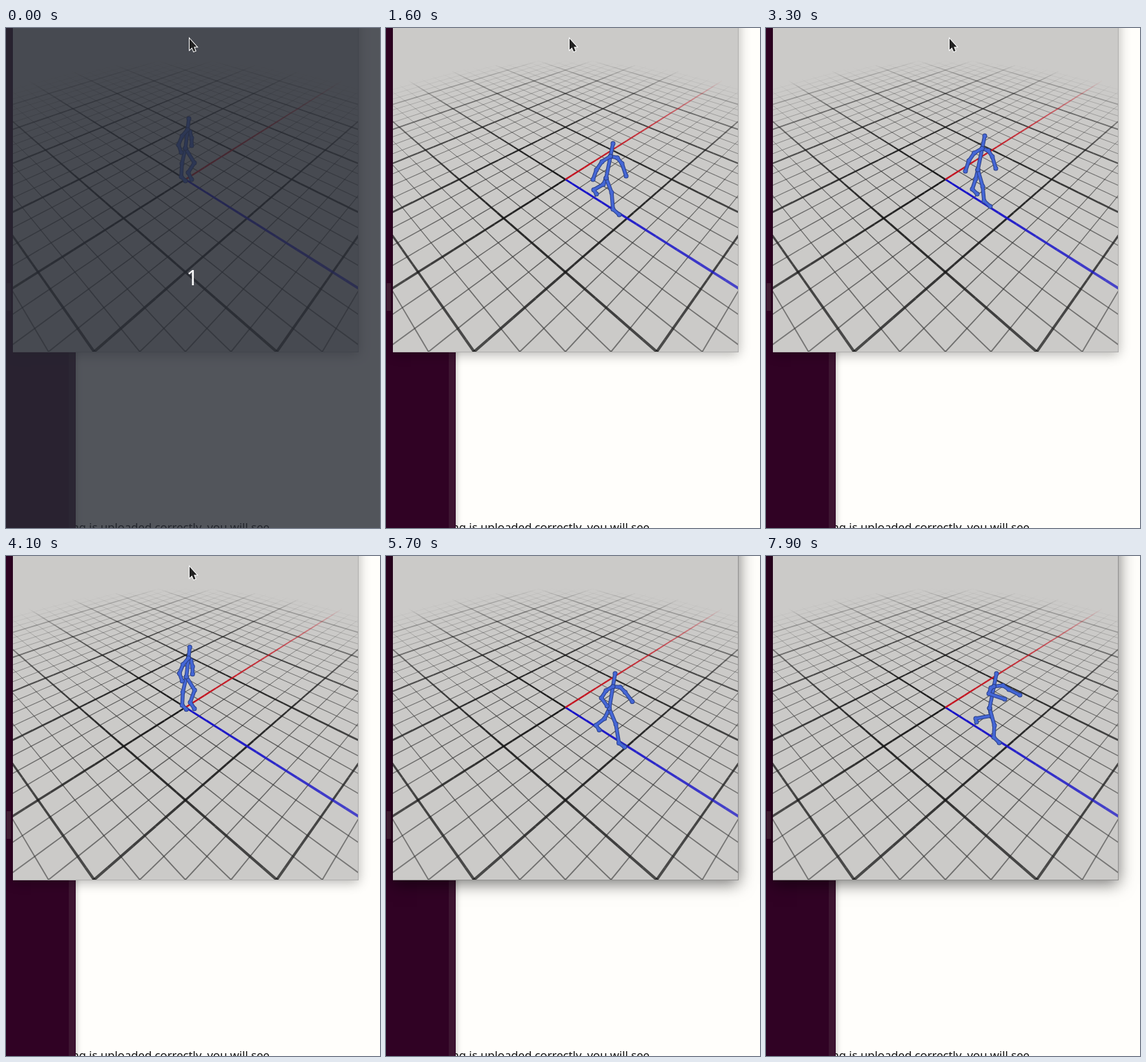
An HTML page with a canvas that plays this animation: 542x723 px, repeating every 8 s.

```html
<!DOCTYPE html>
<html>
<head>
<meta charset="utf-8">
<style>
html, body { margin: 0; width: 100%; height: 100%; overflow: hidden; background: #fffefb; }
canvas { display: block; }
</style>
</head>
<body>
<canvas id="stage" width="542" height="723"></canvas>
<script>
const ctx = document.getElementById('stage').getContext('2d');
const LOOP = 8000, STEP = 100, CYCLE = 6100 / 3, FOCUS_AT = 5100;

// Points: head, pelvis, two arms (elbow, hand), two legs (knee, ankle, toe)
const stand = [269,133, 264,176, 254,171, 258,182, 273,161, 273,172,
  259,198, 258,217, 264,223, 274,192, 273,217, 281,224];
const stride = [283,141, 278,184, 272,166, 305,171, 300,160, 318,164,
  266,205, 257,216, 263,223, 290,206, 299,234, 305,235];
const lift = [297,147, 292,191, 282,188, 284,200, 299,176, 299,187,
  285,213, 268,217, 266,224, 303,211, 299,234, 306,240];
const pass = [317,156, 307,205, 294,192, 289,207, 328,186, 333,203,
  304,218, 299,233, 306,240, 314,229, 316,250, 325,258];
const push = [329,167, 319,217, 305,205, 300,219, 342,196, 348,214,
  315,226, 301,234, 305,240, 327,238, 329,262, 338,270];
const reach = [334,170, 324,220, 323,199, 346,207, 352,193, 368,201,
  326,231, 304,235, 305,240, 331,245, 330,262, 338,270];
const first = stand.map((v, i) => v - (i % 2 ? 2 : 4)).slice(0, 18).concat([273,195, 264,209, 269,219]);
const landing = stride.map((v, i) => i % 2 ? 176 + (v - 141) * 1.2 : 338 + (v - 283) * 1.05);
const keys = [[0, first], [100, stand], [500, stride], [833, lift], [1267, pass],
  [1600, push], [1700, landing], [1800, reach], [CYCLE, first]];

const mix = (a, b, u) => a.map((v, i) => v + (b[i] - v) * u);

function poseAt(t) {
  const phase = t % CYCLE;
  const i = keys.findIndex(k => k[0] > phase);
  const [t0, a] = keys[i - 1], [t1, b] = keys[i];
  return mix(a, b, (phase - t0) / (t1 - t0));
}

function box(c, color, x, y, w, h) {
  c.fillStyle = color;
  c.fillRect(x, y, w, h);
}

function shadow(color, blur, y) {
  ctx.shadowColor = color;
  ctx.shadowBlur = blur;
  ctx.shadowOffsetY = y;
}

// Ground plane: a runs along the blue axis, b towards the lower left
function project(a, b) {
  const depth = 7.177 - a - b;
  return [260 + 552.5 * (a - b) / depth, -128 + 2490 / depth, 552.5 / depth / 77];
}

function drawGrid() {
  const view = document.createElement('canvas');
  view.width = 511;
  view.height = 469;
  const g = view.getContext('2d');
  box(g, '#cbcac8', 10, 0, 500, 468);
  g.beginPath();
  g.rect(10, 0, 500, 468);
  g.clip();

  function line(at, alongA, color, width, strength, from, to) {
    const point = s => alongA ? [s, at] : [at, s];
    g.strokeStyle = color;
    for (let s = from; s < to; s += 0.125) {
      const [a, b] = point(s + 0.0625), r = Math.hypot(a, b);
      if (r >= 5 || a + b > 5) continue;
      const p = project(...point(s)), q = project(...point(s + 0.125));
      g.globalAlpha = strength * (1 - (r / 5) ** 1.6);
      g.lineWidth = width * p[2];
      g.beginPath();
      g.moveTo(p[0], p[1]);
      g.lineTo(q[0], q[1]);
      g.stroke();
    }
  }

  for (const major of [false, true]) {
    for (let n = -20; n <= 20; n++) {
      if ((n % 4 === 0) !== major) continue;
      for (const alongA of [true, false]) {
        const from = n === 0 && !alongA ? 0 : -5, to = n === 0 && alongA ? 0 : 5;
        line(n / 4, alongA, major ? '#111' : '#222', major ? 2.4 : 1.1, major ? 0.95 : 0.72, from, to);
      }
    }
  }
  line(0, true, '#1712c8', 2.7, 1, 0, 5);
  line(0, false, '#c4121e', 2.5, 1, -5, 0);
  return view;
}

const grid = drawGrid();

function drawFigure(pose) {
  const pts = [];
  for (let i = 0; i < 24; i += 2) pts.push([pose[i], pose[i + 1]]);
  const [head, pelvis, elbowL, handL, elbowR, handR, ...legs] = pts;
  const neck = mix(head, pelvis, 0.37);
  const shoulder = elbow => {
    const [x, y] = mix(neck, elbow, 0.6);
    return [x, y - 4];
  };
  const chains = [
    [neck, shoulder(elbowR), elbowR, handR],
    [pelvis, ...legs.slice(0, 3)],
    [pelvis, ...legs.slice(3)],
    [head, neck, pelvis],
    [neck, shoulder(elbowL), elbowL, handL]
  ];
  ctx.lineCap = ctx.lineJoin = 'round';
  for (const chain of chains) {
    for (const [color, width, bead] of [['#2b4088', 5.6, 3.5], ['#4567d6', 3.6, 2.5]]) {
      ctx.strokeStyle = ctx.fillStyle = color;
      ctx.lineWidth = width;
      ctx.beginPath();
      chain.forEach(p => ctx.lineTo(...p));
      ctx.stroke();
      for (const [x, y] of chain) {
        ctx.beginPath();
        ctx.arc(x, y, bead, 0, 7);
        ctx.fill();
      }
    }
  }
}

function drawCursor() {
  const arrow = new Path2D('M266 15.5V31.5L269.6 28.2L272 34L274.6 32.9L272.2 27.2H276.6Z');
  ctx.lineJoin = 'miter';
  ctx.lineWidth = 2;
  ctx.strokeStyle = '#fff';
  ctx.stroke(arrow);
  ctx.fillStyle = '#222';
  ctx.fill(arrow);
}

function draw(t) {
  const focused = t >= FOCUS_AT;
  box(ctx, '#fffefb', 0, 0, 542, 723);
  ctx.fillStyle = '#111';
  ctx.font = '16.7px "Noto Sans", "Open Sans", sans-serif';
  ctx.textAlign = 'right';
  ctx.fillText('ng is uploaded correctly, you will see', 382, 728);

  shadow('rgba(0,0,0,.3)', 9, 1);
  box(ctx, '#300224', 0, -20, 101, 763);
  shadow('transparent', 0, 0);
  box(ctx, '#3d1531', 91, 0, 9, 723);
  box(ctx, '#452139', 1, 369, 6, 40);

  shadow(focused ? 'rgba(0,0,0,.55)' : 'rgba(0,0,0,.3)', focused ? 22 : 16, focused ? 5 : 3);
  box(ctx, focused ? '#929190' : '#b0afae', 10, -30, 501, 499);
  shadow('transparent', 0, 0);
  ctx.drawImage(grid, 0, 0);
  drawFigure(poseAt(t));

  if (t < STEP) {
    box(ctx, 'rgba(39,43,52,.8)', 0, 0, 542, 723);
    ctx.fillStyle = '#fff';
    ctx.font = '30px "Noto Sans", "Open Sans", sans-serif';
    ctx.textAlign = 'center';
    ctx.fillText('1', 270, 372);
  }
  if (!focused) drawCursor();
}

const start = performance.now();
function tick() {
  const t = (performance.now() - start) % LOOP;
  draw(Math.floor(t / STEP) * STEP);
  requestAnimationFrame(tick);
}
tick();
</script>
</body>
</html>
```
